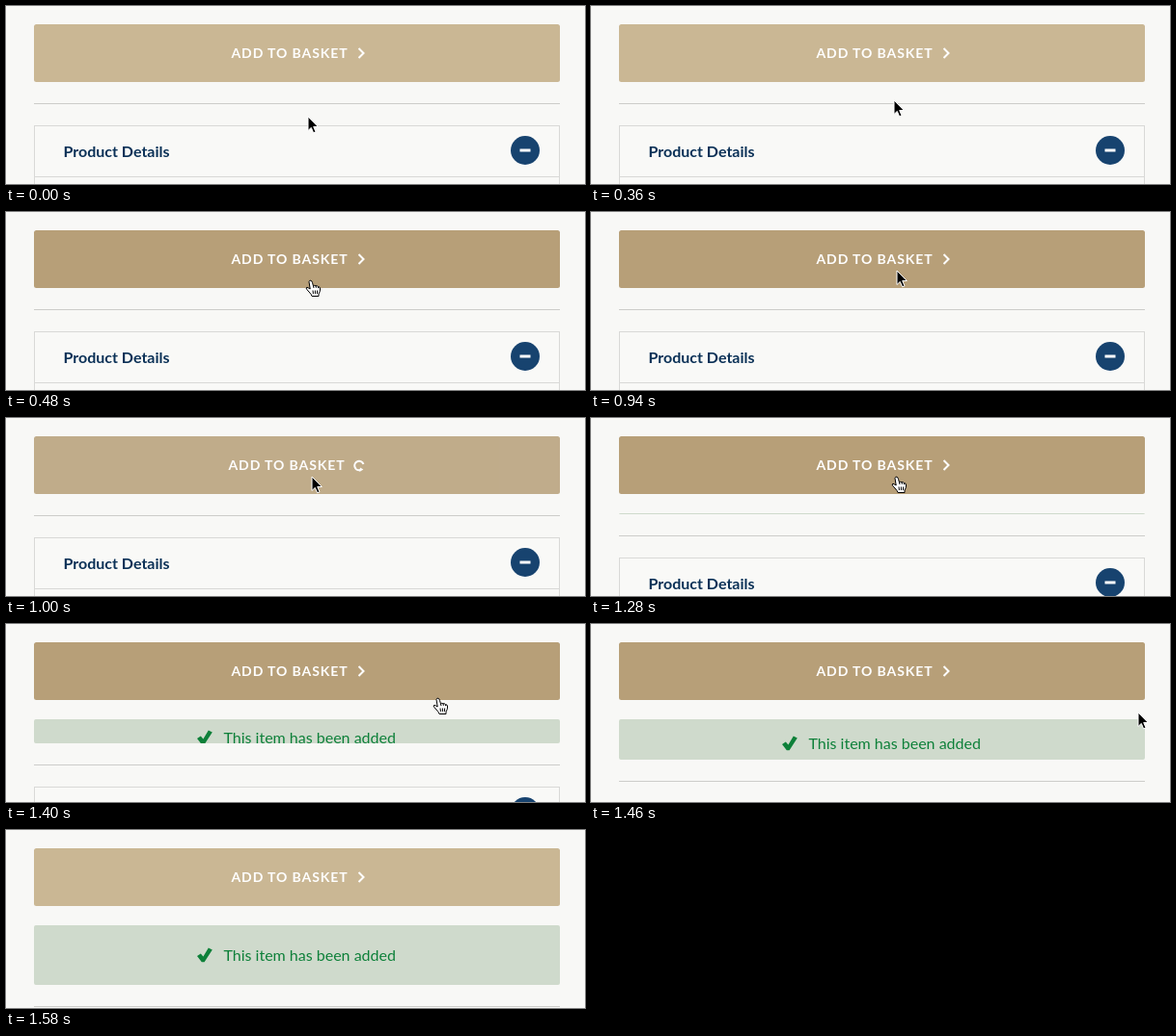
An HTML page that plays this animation: 600x185 px, repeating every 2780 ms.

```html
<!DOCTYPE html>
<html lang="en">
<head>
<meta charset="utf-8">
<title>Add to basket</title>
<style>
  html, body { margin: 0; width: 100%; height: 100%; overflow: hidden; background: #f8f8f6; }
  svg { display: block; }
  text { font: 16px Lato, sans-serif; }
  .label { font-weight: 700; font-size: 14px; letter-spacing: .9px; fill: #fff; text-anchor: middle; }
  .title { font-weight: 700; fill: #0b3157; }
  .icon { fill: none; stroke: #fff; stroke-width: 2; }
</style>
</head>
<body>
<svg width="600" height="185" viewBox="0 0 600 185">
  <defs>
    <clipPath id="clip"><rect id="clipBox" x="29" y="99" width="545" height="0"/></clipPath>
  </defs>

  <g id="button">
    <rect id="face" x="29" y="19" width="545" height="60" rx="2.5"/>
    <g id="content">
      <text class="label" x="294" y="54">ADD TO BASKET</text>
      <path id="chevron" class="icon" d="M365.5 44l5 5-5 5"/>
      <g id="spinner">
        <path class="icon" d="M-4.4 1.6A4.7 4.7 0 1 1 2 4.2"/>
        <path fill="#fff" d="M-6.4 1.2h4.6l-1.6 3.6z"/>
      </g>
    </g>
  </g>

  <g clip-path="url(#clip)">
    <rect id="message" x="29" y="99" width="545" height="0" rx="2" fill="#cfdacc"/>
    <g id="notice" fill="#0d8039">
      <path d="M198-5l3.8-2.6 2.6 3.2 5.4-9.2 4 2-8.2 12.8h-2.8z"/>
      <text x="225.5" y="0">This item has been added</text>
    </g>
  </g>

  <g id="below">
    <path d="M29 101.5h545" stroke="#cdcdca"/>
    <rect x="29.5" y="124.5" width="544" height="90" fill="#f9f9f7" stroke="#d9d9d7"/>
    <path d="M30 177.5h543" stroke="#d9d9d7"/>
    <text class="title" x="59.5" y="157">Product Details</text>
    <circle cx="538" cy="150" r="15" fill="#17436f"/>
    <rect x="532.5" y="148.5" width="11" height="3" fill="#fff"/>
  </g>

  <g id="cursor">
    <path id="arrow" d="M0 0v14.5l3.3-3.1 2.3 5.4 2.4-1-2.3-5.3h4.6z" stroke="#fff"/>
    <g id="hand" stroke="#000" stroke-linejoin="round">
      <path fill="#fff" d="M-2 1.5Q-1.5-.3 0 .2 1 .6 1.5 2.5L2.5 6Q3.5 4.8 5 5.8 6.5 5.2 7.3 6.6 9.6 6.4 9.6 9 9.6 12 8 14V16.5H1Q.5 14.5-2 12-4.5 9.5-5 8-4.3 6.5-2.2 8.2L-.8 9z"/>
      <path fill="none" d="M2 10.5l.4 3.5M4.4 10.5v3.5M6.6 10.5l-.2 3.5M2.5 6l.5 2M5 5.8l.4 2M7.3 6.6l.3 1.6"/>
    </g>
  </g>
</svg>

<script>
const LOOP = 2780;
// The picture is held between these times (ms).
const TICKS = [0, 360, 420, 480, 530, 590, 650, 940, 1000, 1060, 1110, 1170,
  1230, 1280, 1340, 1400, 1460, 1520, 1580];
const IDLE = [202, 183, 148], HOVER = [183, 159, 120];

const $ = id => document.getElementById(id);
const set = (id, name, value) => $(id).setAttribute(name, value);
const show = (id, on) => set(id, 'visibility', on ? 'inherit' : 'hidden');
const ramp = (t, from, to) => Math.min(1, Math.max(0, (t - from) / (to - from)));
const lerp = (a, b, k) => a + (b - a) * k;

function drawButton(t) {
  const hover = ramp(t, 400, 480) - ramp(t, 1460, 1580);
  const loading = t >= 1000 && t < 1280;
  const rgb = IDLE.map((c, i) => Math.round(lerp(c, HOVER[i], hover)));
  set('face', 'fill', `rgb(${rgb})`);
  set('button', 'opacity', loading ? lerp(1, .7, ramp(t, 940, 1060)) : 1);
  set('content', 'transform', `translate(${loading ? -3 : 0})`);
  show('chevron', !loading);
  show('spinner', loading);
  set('spinner', 'transform', `translate(369 49.5) rotate(${(t - 1230) * .36})`);
}

function drawMessage(t) {
  const open = .5 - .5 * Math.cos(Math.PI * ramp(t, 1253, 1589));
  const height = Math.round(62 * open);
  set('message', 'height', height);
  set('clipBox', 'height', height);
  set('notice', 'transform', `translate(0 ${Math.round(116 + 20 * open)})`);
  set('below', 'transform', `translate(0 ${t >= 1280 ? 20 + height : 0})`);
}

function drawCursor(t) {
  const enter = 1 - (1 - ramp(t, 310, 650)) ** 2.43;
  const leave = ramp(t, 1280, 1460) ** 1.6;
  const x = 313 + 4 * enter + 250 * leave;
  const y = 115 - 54 * enter + 31 * leave;
  const busy = t >= 940 && t < 1280;
  const pointing = y < 79 && !busy;
  set('cursor', 'transform', `translate(${Math.round(x)} ${Math.round(y)})`);
  show('cursor', t < 1520);
  show('hand', pointing);
  show('arrow', !pointing);
}

const start = performance.now();
function frame() {
  const now = (performance.now() - start) % LOOP;
  const t = TICKS.findLast(tick => tick <= now);
  drawButton(t);
  drawMessage(t);
  drawCursor(t);
  requestAnimationFrame(frame);
}
frame();
</script>
</body>
</html>
```
